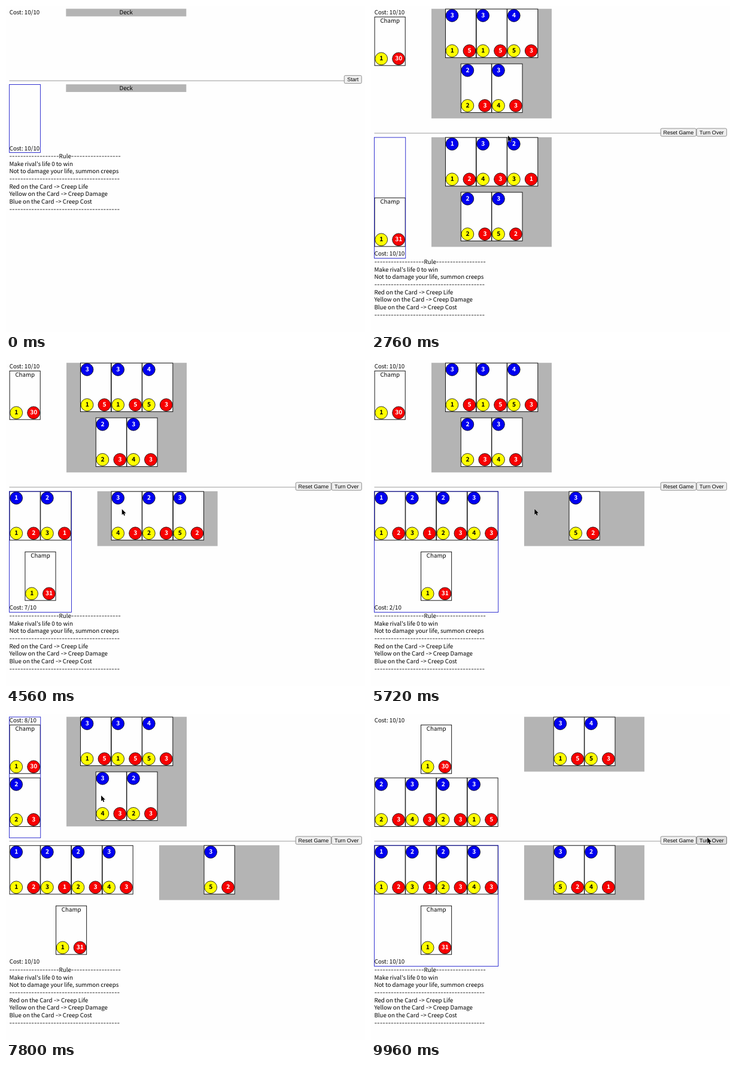
An HTML page that plays this animation: 600 px wide and 546 px high, repeating every 10 s.

```html
<!DOCTYPE html>
<html lang="en">
<head>
<meta charset="utf-8">
<title>Card game</title>
<style>
  html, body { margin: 0; width: 100%; height: 100%; overflow: hidden; background: #fefefe; }
  svg { display: block; width: 600px; height: 546px; text-rendering: geometricPrecision; }
  text { font: 9.72px "Noto Sans CJK KR", "Noto Sans CJK JP", "Noto Sans", sans-serif; white-space: pre; }
  .dash { font-family: Inter, "Noto Sans", sans-serif; font-size: 10.05px; }
  .mid { text-anchor: middle; }
  .num { font-weight: 700; font-size: 10.3px; text-anchor: middle; }
  .btn text { font: 9.05px "Liberation Sans", Arial, sans-serif; text-anchor: middle; }
  .btn rect { fill: #efefef; stroke: #767676; stroke-width: .8; }
  .btn.hover rect { fill: #dfdfdf; stroke: #4f4f4f; }
  .card { fill: #fefefe; stroke: #000; stroke-width: .9; }
  .field { fill: none; stroke: #1010c8; stroke-width: .85; }
  .deck { fill: #b4b4b4; }
  .line { stroke: #808080; stroke-width: .8; }
</style>
</head>
<body>
<svg viewBox="0 0 600 546" xmlns="http://www.w3.org/2000/svg">
  <g id="board"></g>
  <path id="cursor" d="M0 0V9.5L2.2 7.6L3.6 10.9L5.2 10.2L3.8 6.9H6.8Z"
    fill="#000" stroke="#fff" stroke-width=".8" paint-order="stroke"/>
</svg>
<script>
const LOOP = 10000;
const LEFT = 5.7, PITCH = 51.65, CARD_W = 51.1, CARD_H = 81.5;
const DECK_X = 101, DECK_W = 201, ROW_H = 91.8;
const START = [578, 126];
const TURN = { x: 544.2, y: 205, w: 50.2, h: 13.2 };
const DASH = "-".repeat(40), HALF = "-".repeat(18);
const RULES = [
  HALF + "Rule" + HALF, "Make rival's life 0 to win",
  "Not to damage your life, summon creeps", DASH,
  "Red on the Card -> Creep Life", "Yellow on the Card -> Creep Damage",
  "Blue on the Card -> Creep Cost", DASH
];

// Cards are written as cost, damage, life.
const RIVAL = { deck: ["315", "315", "453", "223", "343"], draw: "223", life: 30, top: 4.7 };
const PLAYER = { deck: ["112", "343", "231", "223", "352"], draw: "241", life: 31, top: 219.8 };

// Time and action: a point to visit, a deck index to summon, or a button.
const EVENTS = [
  [440, [546, 471]], [480, [548, 469]], [1520, START], [2280, "start"],
  [2740, [229, 217]], [3760, 0], [4440, 1], [5000, 1], [5480, 0], [6480, "turn"],
  [7600, 3], [8080, 3], [8560, 3], [8980, 0], [9600, "turn"]
];

const clamp = (v, lo, hi) => Math.min(hi, Math.max(lo, v));
const slots = side => Math.max(1, side.field.length);
const deckX = side => DECK_X + (slots(side) - 1) * PITCH;

// Rows of three, each centred in the deck.
function cardSpot(side, i) {
  const row = Math.floor(i / 3);
  const count = Math.min(3, side.deck.length - row * 3);
  return [deckX(side) + DECK_W / 2 + (i % 3 - count / 2) * PITCH, side.top + row * ROW_H];
}

// The nearest point to click, seen from where the pointer is.
function aim(action, state, [px, py]) {
  if (Array.isArray(action)) return action;
  if (action === "start") return START;
  const inset = 18;
  if (action === "turn")
    return [clamp(px, TURN.x + inset, TURN.x + TURN.w - inset), clamp(py, TURN.y + 2, TURN.y + TURN.h - 1.5)];
  const [x, y] = cardSpot(state.sides[state.active], action);
  return [clamp(px, x + inset, x + CARD_W - inset), clamp(py, y + 30, y + 40)];
}

function apply(action, old) {
  const state = structuredClone(old);
  const me = state.sides[state.active];
  if (action === "start") state.started = true;
  if (action === "turn") {
    me.cost = 10;
    state.active = 1 - state.active;
    const next = state.sides[state.active];
    next.deck.push(next.draw);
  }
  if (Number.isInteger(action)) {
    const [card] = me.deck.splice(action, 1);
    me.field.push(card);
    me.cost -= +card[0];
  }
  return state;
}

const first = {
  started: false, active: 1,
  sides: [RIVAL, PLAYER].map(s => ({ ...s, field: [], cost: 10 }))
};
const steps = [{ time: 0, point: [0, 0], state: first }];
for (const [time, action] of EVENTS) {
  const { point, state } = steps[steps.length - 1];
  steps.push({ time, point: aim(action, state, point), state: apply(action, state) });
}

const text = (x, y, s, cls = "") => `<text x="${x}" y="${y}" class="${cls}">${s}</text>`;
const rect = (x, y, w, h, cls) => `<rect x="${x}" y="${y}" width="${w}" height="${h}" class="${cls}"/>`;
const rule = (y, end) => `<line x1="5.5" x2="${end}" y1="${y}" y2="${y}" class="line"/>`;

function button(x, y, w, label, hover) {
  return `<g class="btn${hover ? " hover" : ""}">` +
    `<rect x="${x}" y="${y}" width="${w}" height="${TURN.h}" rx="2"/>` +
    text(x + w / 2, y + 9.8, label) + "</g>";
}

function badge(x, y, fill, ink, n) {
  return `<circle cx="${x}" cy="${y}" r="10.4" fill="${fill}" stroke="#000" stroke-width=".8"/>` +
    `<text x="${x + .2}" y="${y + 3}" class="num" fill="${ink}">${n}</text>`;
}

function card(x, y, cost, damage, life) {
  return rect(x + .4, y + .4, CARD_W, CARD_H, "card") +
    (cost ? badge(x + 11.5, y + 11.3, "#0000f0", "#fff", cost)
          : text(x + 26, y + 9.8, "Champ", "mid")) +
    badge(x + 11.5, y + 70.4, "#ffff00", "#000", damage) +
    badge(x + 40.4, y + 70.4, "#f80000", "#fff", life);
}

function deck(side) {
  const rows = Math.ceil(side.deck.length / 3);
  return rect(deckX(side), side.top, DECK_W, rows * ROW_H, "deck") +
    side.deck.map((c, i) => card(...cardSpot(side, i), ...c)).join("");
}

function half(side, champY, fieldY, costY, active) {
  const n = slots(side);
  return deck(side) +
    side.field.map((c, i) => card(LEFT + i * PITCH, fieldY, ...c)).join("") +
    card(LEFT + (n - 1) * PITCH / 2, champY, 0, 1, side.life) +
    (active ? rect(5.5, side.top + .3, n * PITCH + .6, 202.3, "field") : "") +
    text(LEFT, costY, `Cost: ${side.cost}/10`);
}

function rules(y) {
  const mark = s => s.replace(">", "&gt;").replace(/-+/g, d => `<tspan class="dash">${d}</tspan>`);
  return RULES.map((s, i) => text(5.4, y + i * 12.72, mark(s))).join("");
}

function lobby() {
  return text(LEFT, 14.3, "Cost: 10/10") + text(LEFT, 241.7, "Cost: 10/10") +
    [4.6, 131.2].map(y => rect(100.3, y, DECK_W, 12.8, "deck") + text(200.7, y + 9.3, "Deck", "mid")).join("") +
    rule(125.2, 565) + button(565.3, 116.4, 29, "Start") +
    rect(5.6, 131.5, 51.8, 114, "field") + rules(254.8);
}

function game({ sides: [rival, player], active }, hover) {
  return half(rival, 17.9, 106.6, 14.3, active === 0) +
    half(player, 320.9, 219.9, 418, active === 1) +
    rule(213, 484) + button(484.2, TURN.y, 59.2, "Reset Game") +
    button(TURN.x, TURN.y, TURN.w, "Turn Over", hover) + rules(431.8);
}

// The pointer arrives just in time for the next action.
function pointerAt(t, i) {
  const from = steps[i], to = steps[i + 1] || from;
  const span = Math.min(800, (to.time - from.time) * .8) || 1;
  const u = clamp((t - to.time + span) / span, 0, 1);
  const e = u * u * (3 - 2 * u);
  return from.point.map((v, k) => v + (to.point[k] - v) * e);
}

const board = document.getElementById("board");
const cursor = document.getElementById("cursor");
let shown = "";

function draw() {
  const t = performance.now() % LOOP;
  const i = steps.findLastIndex(s => s.time <= t);
  const [x, y] = pointerAt(t, i);
  const hover = x > TURN.x && x < TURN.x + TURN.w && y > TURN.y && y < TURN.y + TURN.h;
  const key = i + "/" + hover;
  if (key !== shown) {
    const { state } = steps[i];
    board.innerHTML = state.started ? game(state, hover) : lobby();
    shown = key;
  }
  cursor.setAttribute("visibility", i > 0 ? "visible" : "hidden");
  cursor.setAttribute("transform", `translate(${x} ${y})`);
  requestAnimationFrame(draw);
}
draw();
</script>
</body>
</html>
```
